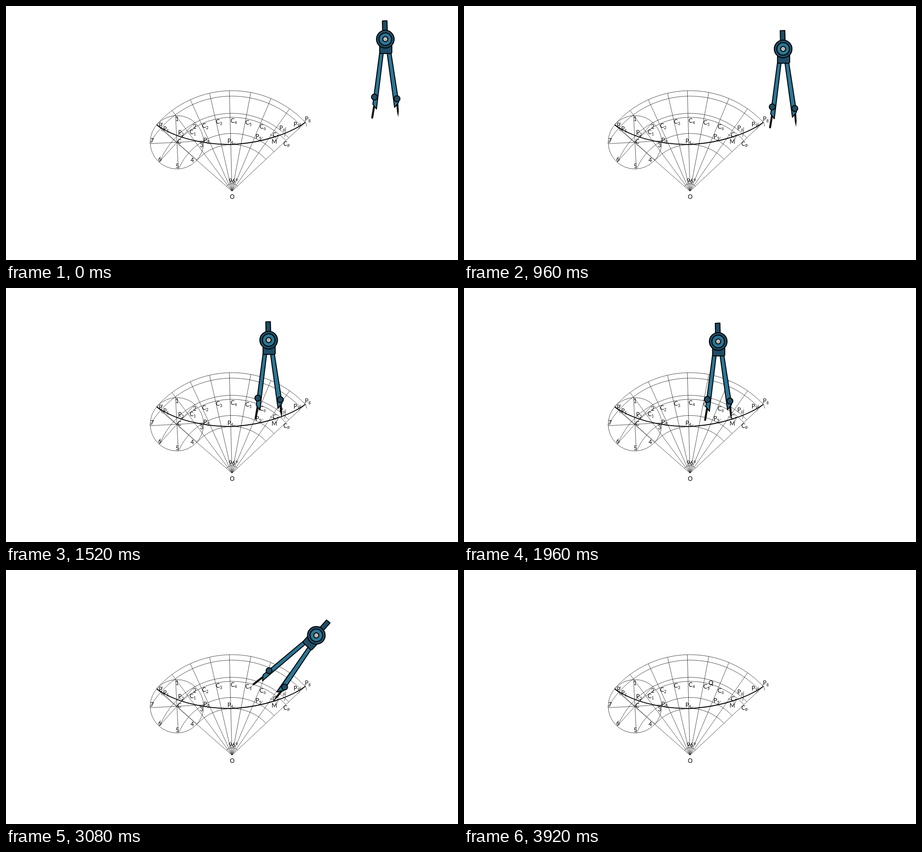
These frames come from a looping animation (998 by 561 pixels, 3.96 s). An HTML page:

```html
<!DOCTYPE html>
<html lang="en">
<head>
<meta charset="utf-8">
<title>Compass construction</title>
<style>
  html, body { margin: 0; width: 100%; height: 100%; overflow: hidden; background: #fff; }
  svg { display: block; width: 100%; height: 100%; }
  text { font: 13px Lato, "Open Sans", sans-serif; fill: #000; }
  .sub { font-size: 8.6px; }
  .thin { fill: none; stroke: #111; stroke-width: .75; }
  .bold { fill: none; stroke: #000; stroke-width: 1.9; }
  .dark { fill: #1e4d66; }
  .blue { fill: #2b7696; }
  .ink { stroke: #000; stroke-width: 2; stroke-linejoin: round; }
</style>
</head>
<body>
<svg viewBox="0 0 998 561">
  <g id="drawing"></g>
  <path id="mark" class="thin"/>
  <g id="labels"></g>
  <text id="found" x="540" y="254">Q</text>
  <g id="compass">
    <path d="M813.2 219L808.6 246.5" stroke="#111" stroke-width="4.4" stroke-linecap="round"/>
    <path d="M861.5 216L866 212L867.3 232L866 245.5L863.4 234Z" fill="#111"/>
    <path class="ink blue" d="M825 103L833 104L818 227.5L810 217Z"/>
    <path class="ink blue" d="M841.5 104L850 103L867 212.5L858 224Z"/>
    <path class="ink dark" d="M831 33L841.3 32.4L842 57L831.5 57Z"/>
    <path class="ink dark" d="M825 86H852V102Q852 105 849 105H828Q825 105 825 102Z"/>
    <circle class="ink dark" cx="837.5" cy="73.2" r="19.6"/>
    <circle class="ink blue" cx="837.5" cy="73.2" r="13.8"/>
    <circle class="ink" cx="837.5" cy="73.2" r="5.6" fill="#bcb6b0"/>
    <circle class="ink dark" cx="813.5" cy="201.2" r="6.6"/>
    <circle class="ink dark" cx="863.3" cy="204.8" r="6.6"/>
  </g>
</svg>
<script>
const LOOP = 3960;
const $ = id => document.getElementById(id);
const rad = deg => deg * Math.PI / 180;
const O = { x: 499, y: 409 };

// Angles from O are measured clockwise from straight up.
const polar = (r, deg) => [O.x + r * Math.sin(rad(deg)), O.y - r * Math.cos(rad(deg))];
const arc = (r, a, b) => `M${polar(r, a)}A${r} ${r} 0 0 1 ${polar(r, b)}`;

function add(parent, tag, attrs, html = "") {
  const el = document.createElementNS("http://www.w3.org/2000/svg", tag);
  for (const k in attrs) el.setAttribute(k, attrs[k]);
  el.innerHTML = html;
  $(parent).appendChild(el);
}

function buildDrawing() {
  const C = { x: 377.4, y: 301, r: 59 };
  const RIGHT = 46.8;
  let d = "";
  [[222, -48.7], [210, -59.8], [172, -68], [163.2, -48.2], [127.5, -66.5], [103, -48.4], [16.5, -48.5]]
    .forEach(([r, from]) => d += arc(r, from, RIGHT));
  [-48.7, -36.6, -24.5, -12.9, -1.5, 10.8, 22.8, 34.9, RIGHT]
    .forEach(a => d += `M${O.x} ${O.y}L${polar(222, a)}`);
  for (let k = 0; k < 4; k++) {
    const x = C.r * Math.cos(rad(42 + 45 * k)), y = C.r * Math.sin(rad(42 + 45 * k));
    d += `M${C.x - x} ${C.y - y}L${C.x + x} ${C.y + y}`;
  }
  // short compass ticks at the located points
  d += "M346 257Q340 266 345 277M383 281Q386 287 391 289M441 301L449 297M498 306L507 302" +
       "M559 298L567 289M617.5 268Q618 279 615 289M650 258Q651 266 646 272" +
       "M659 253Q663 259 664 266M583 284Q592 287 600 294";
  add("drawing", "path", { class: "thin", d });
  add("drawing", "circle", { class: "thin", cx: C.x, cy: C.y, r: C.r });
  add("drawing", "path", { class: "bold", d: "M333 263C372 290 430 305.5 494 306C560 304 625 283 661 257" });
}

function buildLabels() {
  const list = "P 337.5 268,P1 347 276,P2 380 284,P3 436 301,P4 489 302.5,P5 551 293,P6 603.5 274," +
    "P7 635 266,P8 660 254,C 378.5 304,C1 405.5 283,C2 433 269,C3 463.5 260,C4 496 258,C5 528.5 262," +
    "C6 560 271,C7 589 289,CP 612.5 309,M 586.5 304,O 494.3 426,1 374 254,2 413 271,3 428 311.5," +
    "4 407.5 345,5 374.5 357.5,6 336 343,7 319 302,96° 491.5 391";
  for (const item of list.split(",")) {
    const [name, x, y] = item.split(" ");
    const html = /^[PC]./.test(name)
      ? `${name[0]}<tspan class="sub" dy="2.5">${name[1]}</tspan>` : name;
    add("labels", "text", { x, y }, html);
  }
}

const TRAVEL = { x: -276.2, y: 44.9 };
const NEEDLE = { x: 865.8, y: 245.2 };
const M = { x: NEEDLE.x + TRAVEL.x, y: NEEDLE.y + TRAVEL.y };
const SWING_AT = 2000, SWING_FROM = 32, SWING_RATE = 0.0098, LIFT_AT = 3920;

function ease(u) {
  u = Math.min(1, Math.max(0, u));
  return u * u * u * (10 - 15 * u + 6 * u * u);
}

// pencil tip after swinging by deg about M
function pencil(deg) {
  const c = Math.cos(rad(deg)), s = Math.sin(rad(deg));
  return [M.x - 57.3 * c - 2.8 * s, M.y - 57.3 * s + 2.8 * c];
}

function render(t) {
  const p = ease((t - 40) / 1880);
  const swinging = t >= SWING_AT;
  const turn = swinging ? SWING_FROM + SWING_RATE * (Math.min(t, LIFT_AT) - SWING_AT) : 0;
  const lifted = t >= LIFT_AT;
  $("compass").setAttribute("transform",
    `rotate(${turn} ${M.x} ${M.y}) translate(${TRAVEL.x * p} ${TRAVEL.y * p})`);
  $("compass").style.display = lifted ? "none" : "";
  $("found").style.display = lifted ? "" : "none";
  $("mark").setAttribute("d", swinging
    ? `M${pencil(SWING_FROM)}A57.4 57.4 0 0 1 ${pencil(turn)}` : "");
}

buildDrawing();
buildLabels();
const start = performance.now();
function tick() {
  render((performance.now() - start) % LOOP);
  requestAnimationFrame(tick);
}
tick();
</script>
</body>
</html>
```
